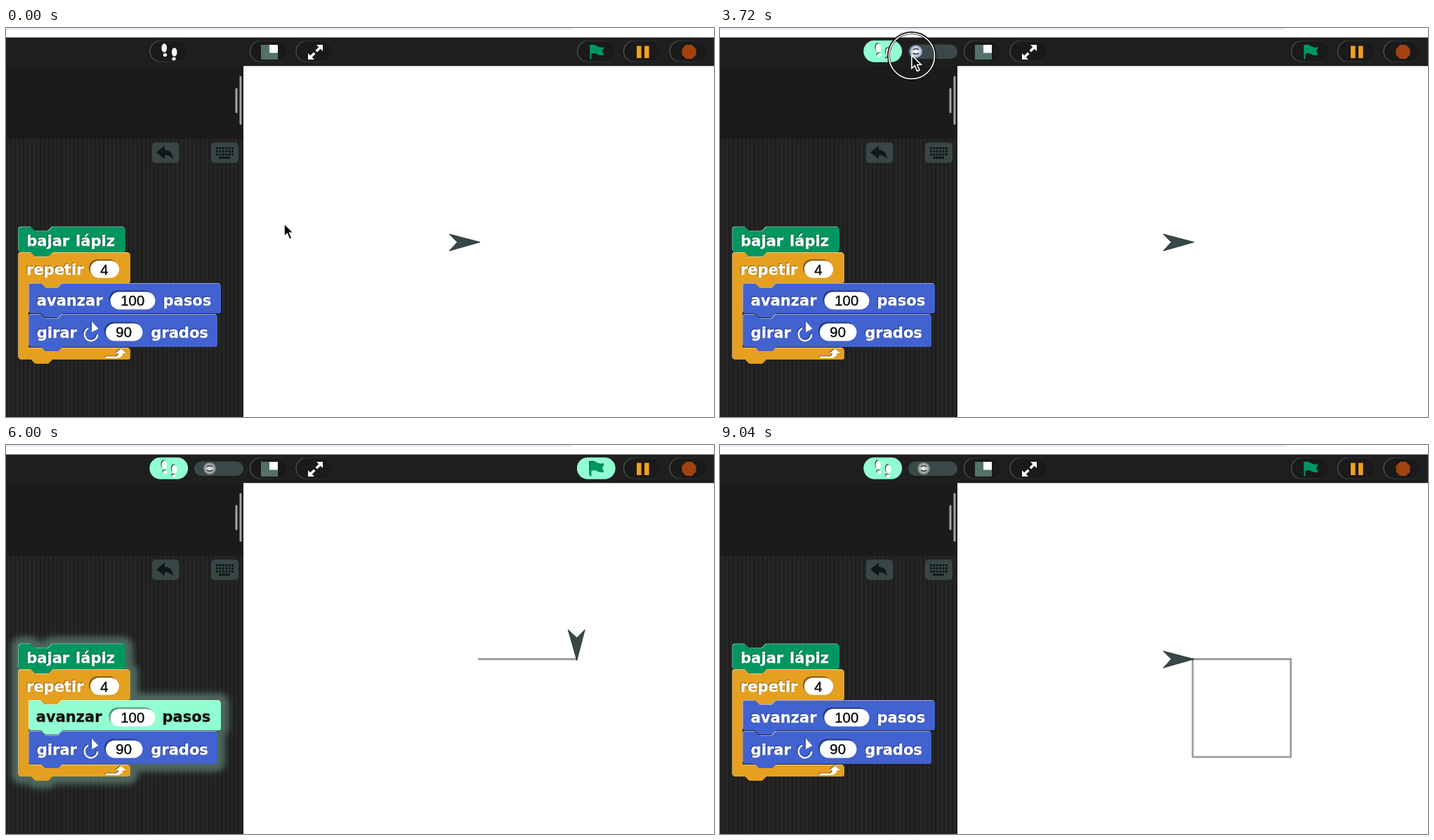
These frames come from a looping animation (1008x555 px, 9080 ms). An HTML page:

```html
<!DOCTYPE html>
<html lang="es">
<head>
<meta charset="utf-8">
<title>Depuración paso a paso</title>
<style>
html, body { margin: 0; width: 100%; height: 100%; overflow: hidden; background: #fff; }
svg { display: block; }
.label { font: bold 21px Verdana, "DejaVu Sans", sans-serif; word-spacing: 1.5px; fill: #fff; stroke: #fff; stroke-width: .3; }
.num { font: 20.4px "Liberation Sans", Arial, sans-serif; fill: #000; stroke: #000; stroke-width: .3; text-anchor: middle; }
.hint { font: italic 14px "Liberation Sans", Arial, sans-serif; fill: #000; }
.green { fill: #009660; --lo: #00583a; --hi: #6cc3a5; }
.orange { fill: #e6a01f; --lo: #8a5f12; --hi: #f2cc83; }
.blue { fill: #4262d0; --lo: #24397f; --hi: #98abe8; }
.shape { filter: drop-shadow(.6px .6px 0 var(--lo)) drop-shadow(-.6px -.6px 0 var(--hi)); }
.block .label, .block .icon { filter: drop-shadow(-1px -1px 0 var(--lo)); }
.block.on { fill: #91ffd1; --lo: #4f9478; --hi: #c8ffe8; }
.block.on .label { fill: #101010; stroke: #101010; filter: none; transform: translate(-1px, -1px); }
.slot { fill: #fff; filter: drop-shadow(-1.2px -1.2px 0 var(--lo)); }
.slot.on { fill: #91ffd1; }
.pill { fill: #1a1a1a; stroke: url(#edge); stroke-width: 1.3; }
.on > .pill { fill: #91ffd1; stroke: #91ffd1; }
.feet { fill: #fff; }
.on > .feet { filter: drop-shadow(-1px -1px 0 #1d3b32); }
.on > .flag { filter: drop-shadow(-1px -1px 0 #0a4a33); }
.glow { fill: #7fb8a6; stroke: #7fb8a6; stroke-width: 22; stroke-linejoin: round; opacity: .46; filter: blur(4px); }
.key { fill: #384646; }
</style>
</head>
<body>
<svg width="1008" height="555" viewBox="0 0 1008 555">
  <defs>
    <linearGradient id="edge">
      <stop offset="0" stop-color="#4b5654"/><stop offset=".3" stop-color="#292e2e"/><stop offset="1" stop-color="#202222"/>
    </linearGradient>
    <radialGradient id="grey"><stop offset=".25" stop-color="#e4e4e4"/><stop offset="1" stop-color="#747878"/></radialGradient>
    <radialGradient id="lilac"><stop offset=".25" stop-color="#fff"/><stop offset="1" stop-color="#8e9ec8"/></radialGradient>
    <pattern id="stripes" width="6" height="6" patternUnits="userSpaceOnUse">
      <rect width="6" height="6" fill="#252525"/><rect width="2" height="6" fill="#1d1d1d"/>
    </pattern>
    <path id="down" d="M21.500 284.500H36l6 6h18l6-6H166.500q3.500 0 3.500 3.500V316.500q0 3.500-3.500 3.500H66l-6 6h-18l-6-6H21.500q-3 0-3-3.500V288q0-3.500 3-3.500z"/>
    <path id="loop" d="M21.500 321H36l6 6h18l6-6H173.500q3.500 0 3.500 3.500V360.500q0 3.500-3.500 3.500H80l-6 6h-18l-6-6H35.500q-3.500 0-3.500 3.500V453.500q0 3.500 3.500 3.500H173.500q3.500 0 3.500 3.500V469.500q0 3.500-3.500 3.500H66l-6 6h-18l-6-6H21.500q-3 0-3-3.500V324.500q0-3.500 3-3.500z"/>
    <path id="move" d="M36 365H50l6 6h18l6-6H302.500q3.500 0 3.500 3.500V403.500q0 3.500-3.500 3.500H80l-6 6h-18l-6-6H36q-3 0-3-3.500V368.500q0-3.500 3-3.500z"/>
    <path id="turn" d="M36.500 409H50l6 6h18l6-6H297.500q3.500 0 3.500 3.500V451.500q0 3.500-3.500 3.500H80l-6 6h-18l-6-6H36.500q-3 0-3-3.500V412.500q0-3.500 3-3.500z"/>
  </defs>

  <!-- window -->
  <path d="M0 0H808q-2 2.500-6 2.500H0z" fill="#ebe8f4"/>
  <rect y="13.500" width="1008" height="41" fill="#1e1e1e"/>
  <rect y="54" width="338" height="104" fill="#1b1b1b"/>
  <rect y="158" width="338" height="397" fill="url(#stripes)"/>
  <path d="M328 87V120M334 70V136.500" stroke="#a3a3a3" stroke-width="3" stroke-linecap="round"/>

  <!-- palette buttons -->
  <g class="key"><rect x="208" y="163.500" width="38.500" height="29" rx="5"/><rect x="292" y="163.500" width="39" height="29" rx="5"/></g>
  <path d="M214 177.500L226 168V174Q237 174 238 187Q233 181 226 181.500V187z" fill="#111716"/>
  <g fill="none" stroke="#111716" stroke-width="3" stroke-dasharray="3 1.400">
    <path d="M299 171.500H325M299 176H325M299 180.500H325"/><path d="M303 185H319" stroke-dasharray="none"/>
  </g>

  <!-- control bar -->
  <g id="step">
    <rect class="pill" x="205" y="18.500" width="53.500" height="29.500" rx="14.700"/>
    <g class="feet">
      <ellipse cx="225.300" cy="28.500" rx="3.800" ry="6.200"/><ellipse cx="226.500" cy="38.500" rx="2.700" ry="2.400"/>
      <ellipse cx="239.700" cy="34.500" rx="3.800" ry="6.200"/><ellipse cx="239" cy="44" rx="2.700" ry="2.300"/>
    </g>
  </g>
  <g id="slider">
    <rect x="268" y="23.500" width="70" height="20.500" rx="10.200" fill="#3a4948"/>
    <g id="knob"><circle id="disc" r="9"/><path d="M-4-2.500Q0-5 4-2.500M-4 2.500Q0 5 4 2.500" fill="none" stroke="#303838" stroke-width="1.600"/></g>
  </g>
  <rect class="pill" x="347.500" y="18.500" width="53" height="29.500" rx="14.700"/>
  <rect x="363" y="24" width="24" height="21" fill="#54706a"/><rect x="375" y="24" width="12" height="11.500" fill="#fff"/>
  <rect class="pill" x="413" y="18.500" width="53" height="29.500" rx="14.700"/>
  <path d="M451 24V33L447.800 29.800L443 34.600L440.400 32L445.200 27.200L442 24zM430 45V36L433.200 39.200L438 34.400L440.600 37L435.800 41.800L439 45z" fill="#fff"/>
  <g id="go">
    <rect class="pill" x="813.500" y="18.500" width="53.500" height="29.500" rx="14.700"/>
    <path class="flag" d="M831 24H833Q838 23 842 26Q847 29 852 27L849 33L851.500 38.500Q846 40 842 37.500Q838 35 833.500 37V44.500H831.500z" fill="#009660"/>
  </g>
  <rect class="pill" x="879.500" y="18.500" width="53" height="29.500" rx="14.700"/>
  <path d="M898 25.500h6.500v17.500h-6.500zM909 25.500h6.500v17.500h-6.500z" fill="#f0a020"/>
  <rect class="pill" x="945" y="18.500" width="53" height="29.500" rx="14.700"/>
  <path d="M968.300 24h8.400l5.800 5.800v8.400l-5.800 5.800h-8.400l-5.800-5.800v-8.400z" fill="#a04310"/>

  <!-- script -->
  <g id="glow" class="glow"><use href="#down"/><use href="#loop"/><use href="#move"/><use href="#turn"/></g>
  <g id="bLoop" class="block orange">
    <use href="#loop" class="shape"/>
    <text class="label" x="29" y="352">repetir</text>
    <rect id="sLoop" class="slot" x="120" y="332" width="41" height="24.500" rx="12.200"/>
    <text class="num" x="139.800" y="351.500">4</text>
    <path class="icon" d="M142 468.500H156Q160 468 160 464H156L163.500 457.500L171 464H166.500Q166 471 157 471H142z" fill="#fff"/>
  </g>
  <g id="bDown" class="block green">
    <use href="#down" class="shape"/>
    <text class="label" x="29.300" y="311">bajar lápiz</text>
  </g>
  <g id="bMove" class="block blue">
    <use href="#move" class="shape"/>
    <text class="label" x="43.800" y="396">avanzar</text>
    <text class="label" x="223.500" y="396">pasos</text>
    <rect id="sMove" class="slot" x="148.500" y="376.500" width="64" height="25" rx="12.500"/>
    <text class="num" x="180.300" y="396">100</text>
  </g>
  <g id="bTurn" class="block blue">
    <use href="#turn" class="shape"/>
    <text class="label" x="43.800" y="441.500">girar</text>
    <text class="label" x="206.300" y="441.500">grados</text>
    <g class="icon">
      <path d="M117 428.500A9.300 9.300 0 1 0 130.300 437" fill="none" stroke="#fff" stroke-width="2.400"/>
      <path d="M122 418.500L131.500 429L122 434z" fill="#fff"/>
    </g>
    <rect id="sTurn" class="slot" x="142" y="421.500" width="52.500" height="25" rx="12.500"/>
    <text class="num" x="167.700" y="441">90</text>
  </g>

  <!-- stage -->
  <rect x="338" y="54.500" width="670" height="501" fill="#fff"/>
  <polyline id="trail" fill="none" stroke="#9b9f9f" stroke-width="2.800" stroke-linecap="round" stroke-linejoin="round"/>
  <path id="turtle" d="M2 0L-42-11.500L-30.500 0L-42 12.500z" fill="#384747" stroke="#1f2929" stroke-width=".8"/>

  <!-- hint and pointer -->
  <g id="hint">
    <path d="M258 18.500H415q6 0 6 6V34q0 6-6 6H268L253 48L257 40q-5-1-5-6V24.500q0-6 6-6z" fill="#efeff1" stroke="#8b9796" stroke-width="1.600"/>
    <text class="hint" x="259" y="34">Depuración paso a paso</text>
  </g>
  <g id="mouse">
    <g id="ring" fill="none"><circle cy="1" r="33" stroke="#111" stroke-width="4"/><circle cy="1" r="32.500" stroke="#fff" stroke-width="1.600"/></g>
    <path d="M0 0V18.500L4.300 14.600L7.600 22.500L11 21L7.700 13.300H13.300z" fill="#050505" stroke="#fff" stroke-width="1.600"/>
  </g>
</svg>
<script>
const LOOP = 9080, RUN = 4800, BEAT = 128, SIDE = 139.7;
const $ = id => document.getElementById(id);
const show = (id, on) => $(id).style.visibility = on ? 'visible' : 'hidden';
const place = (id, x, y, deg = 0) => $(id).setAttribute('transform', `translate(${x} ${y}) rotate(${deg})`);

// Order in which blocks and their inputs light up
const round = ['sMove', 'bMove', 'sTurn', 'bTurn', 'bLoop'];
const order = ['bDown', 'sLoop', 'bLoop', ...round, ...round, ...round, ...round];
const parts = [...new Set(order)];

const left = 673, top0 = 305.5;
const corners = [[left, top0], [left + SIDE, top0], [left + SIDE, top0 + SIDE], [left, top0 + SIDE]];

// Pointer stops: time, x, y
const stops = [
  [100, 396, 279], [880, 237, 36], [1700, 237, 36], [2250, 297, 35], [2400, 297, 35],
  [2660, 279, 36], [3000, 279, 36], [3700, 273, 39], [3850, 273, 39], [4250, 284, 37]
];

function pointer(t) {
  if (t <= stops[0][0]) return stops[0].slice(1);
  for (let i = 1; i < stops.length; i++) {
    const [t0, x0, y0] = stops[i - 1], [t1, x1, y1] = stops[i];
    if (t < t1) {
      const p = (t - t0) / (t1 - t0), e = p * p * (3 - 2 * p);
      return [x0 + (x1 - x0) * e, y0 + (y1 - y0) * e];
    }
  }
  return stops[stops.length - 1].slice(1);
}

function draw(t) {
  const [x, y] = pointer(t);
  const stepping = t >= 1400, drag = t >= 2400 && t < 4300;
  place('mouse', x, y);
  show('mouse', t < 4480);
  show('ring', t >= 1000 && t < 1400 || drag);
  show('hint', t >= 1080 && t < 1400);

  $('step').classList.toggle('on', stepping);
  show('slider', stepping);
  place('knob', t < 2400 ? 303 : Math.max(278, x + 6), 33.5);
  $('disc').setAttribute('fill', drag ? 'url(#lilac)' : 'url(#grey)');

  const beat = Math.floor((t - RUN) / BEAT);
  const running = beat >= 0 && beat < order.length;
  $('go').classList.toggle('on', running);
  show('glow', running);
  for (const id of parts) $(id).classList.toggle('on', running && order[beat] === id);

  // Each round moves as its third beat begins and turns as its fifth begins
  const count = first => Math.max(0, Math.min(4, Math.floor((beat - first) / 5) + 1));
  const moves = count(5), turns = count(7);
  const path = Array.from({ length: moves + 1 }, (_, i) => corners[i % 4]);
  $('trail').setAttribute('points', moves ? path.join(' ') : '');
  place('turtle', ...path[moves], turns * 90);
}

const begin = performance.now();
function tick(now) {
  const t = Math.max(0, now - begin) % LOOP;
  draw(Math.floor(t / 40) * 40);
  requestAnimationFrame(tick);
}
draw(0);
requestAnimationFrame(tick);
</script>
</body>
</html>
```
